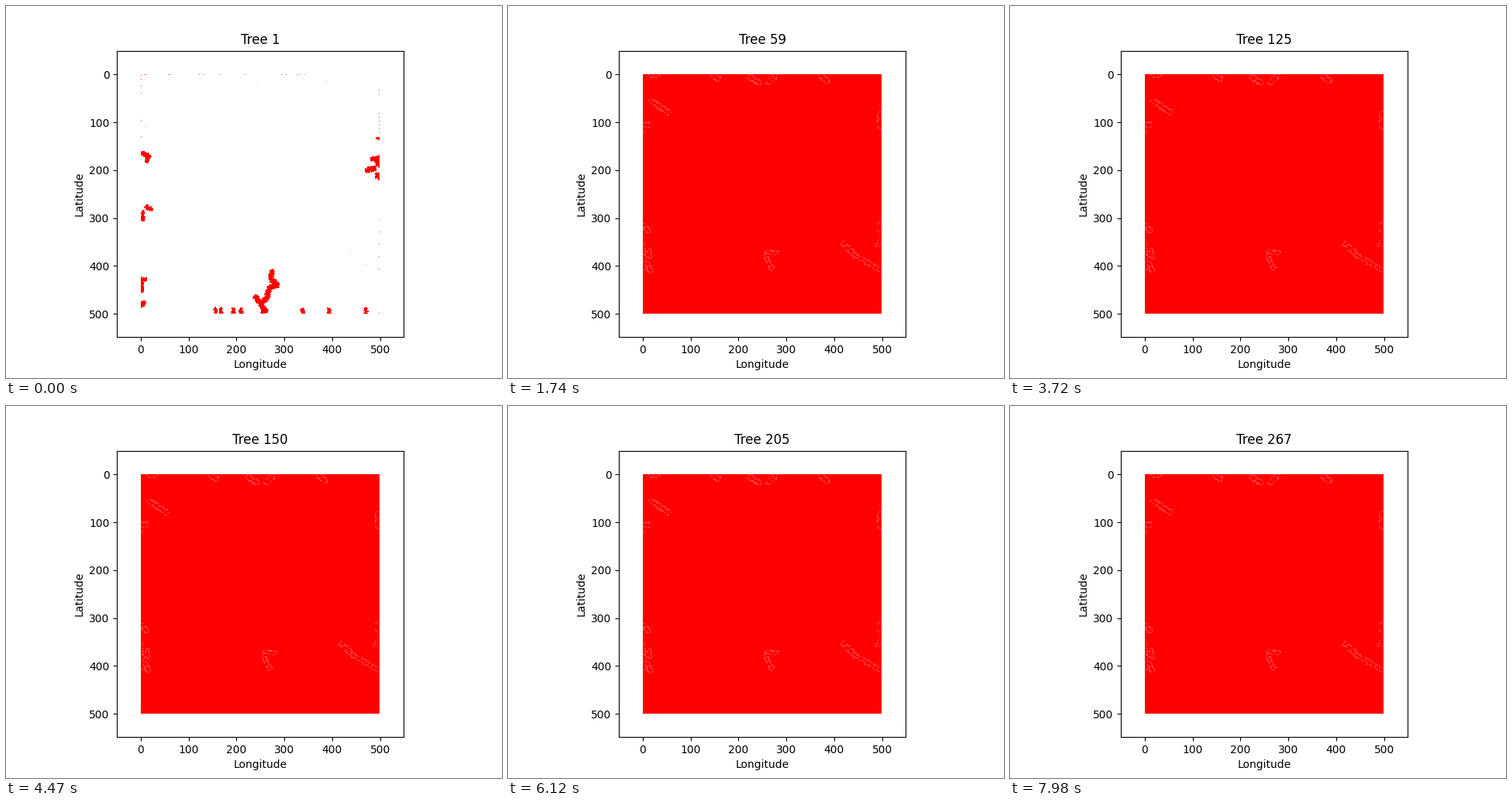
A matplotlib script for the animation above (8000 ms loop, 640 by 480 pixels).

```python
import numpy as np
import matplotlib.pyplot as plt
from matplotlib.animation import FuncAnimation

LOOP, FRAMES = 8000, 267
X0, Y0, W, H = 174, 88, 308, 309      # field in stage pixels
FULL = 50                             # tree that floods the field
rng = np.random.default_rng(4)

# Clusters run along short chains of points.
WEST = [[(176, 190), (184, 194), (181, 199)],
        [(181, 259), (187, 262)], [(176, 266), (176, 275)],
        [(179, 352), (175, 352), (174, 367)], [(177, 382), (175, 386)]]
SOUTH = [[(343, 343), (341, 351), (349, 359), (340, 363), (336, 376),
          (328, 384), (322, 375)], [(328, 384), (334, 393)]]
EAST = [[(473, 197), (480, 196), (481, 204)], [(466, 211), (474, 209)],
        [(479, 218), (481, 220)]]
FLOOR = [270, 277, 293, 303, 331, 382, 416, 464]

EARLY = [[(174, 163), (174, 166)], [(175, 283), (181, 290)],
         [(175, 307), (175, 339)], [(182, 315), (183, 323)],
         [(179, 332), (184, 343)], [(333, 318), (346, 318)],
         [(334, 322), (336, 331), (344, 344)],
         [(432, 306), (447, 321), (481, 341)],
         [(480, 280), (478, 288)], [(480, 304), (477, 308)]]
LATE = [[(185, 123), (207, 137)], [(176, 153), (181, 153)],
        [(480, 139), (480, 155)], [(186, 89), (192, 89)],
        [(265, 90), (271, 94)], [(313, 92), (324, 99)],
        [(336, 98), (345, 90)], [(404, 90), (412, 97)]]

gy, gx = np.mgrid[Y0:Y0 + H, X0:X0 + W]
noise = rng.normal(size=(H, W))
rough = 0.32 * (noise + np.roll(noise, 1, 0) + np.roll(noise, 1, 1))


def links(chains, step=99):
    """Cut chains into links no longer than step, lowest first."""
    parts = []
    for pts in np.array(chains, dtype=object):
        pts = np.array(pts, float)
        for a, b in zip(pts, pts[1:]):
            k = int(np.ceil(np.hypot(*(b - a)) / step))
            parts += [(a + (b - a) * j / k, a + (b - a) * (j + 1) / k)
                      for j in range(k)]
    return sorted(parts, key=lambda p: -min(p[0][1], p[1][1]))


def blob(r, a, b):
    """Ragged capsule from a to b."""
    dx, dy = b - a
    t = ((gx - a[0]) * dx + (gy - a[1]) * dy) / (dx * dx + dy * dy)
    t = np.clip(t, 0, 1)
    return np.hypot(gx - a[0] - t * dx, gy - a[1] - t * dy) + rough < r


born = np.full((H, W), FULL)
label = np.zeros((H, W), int)


def grow(chains, start, end, r):
    parts = links(chains, 9)
    times = np.linspace(start, end, len(parts)).round().astype(int)
    for (a, b), n in zip(parts, times):
        area = blob(r, a, b) & (born == FULL)
        born[area] = n
        label[area] = label.max() + 1


floor = [[(x, 391), (x, 396)] for x in FLOOR]
for chains, r in ((WEST, 2.9), (SOUTH, 3.6), (EAST, 3.8), (floor, 2.6),
                  ([[(479, 170), (481, 170)]], 2)):
    for a, b in links(chains):
        born[blob(r, a, b)] = 1
grow(EARLY, 2, 30, 2.5)
grow(LATE, 31, FULL - 1, 3)

# Faint broken seams stay between neighbouring trees.
seam = np.zeros((H, W), bool)
seam[:, :-1] |= label[:, :-1] != label[:, 1:]
seam[:-1] |= label[:-1] != label[1:]
seam &= rng.random((H, W)) < 0.6

# Lone cells along the edges.
dots = np.zeros((H, W))
dots[0, rng.choice(235, 13, replace=False)] = 0.75
dots[rng.choice(85, 6, replace=False), 0] = 0.75
dots[50:76:5, -1] = 0.75
dots[20:27:6, -1] = 0.75
dots[187:258:16, -1] = 0.75
dots[-1, -1] = 0.75
dots[11, 150] = dots[8, 239] = dots[67, 5] = 0.4
dots[231, 269] = dots[245, 289] = dots[-1, 0] = 0.4


def field(n):
    ink = np.where(born <= n, 1.0, dots)
    if n >= FULL:
        ink[seam] = 0.68
    rgb = np.full((H, W, 3), 255, np.uint8)
    rgb[..., 1:] = (255 * (1 - ink)).astype(np.uint8)[..., None]
    return rgb


fig, ax = plt.subplots(figsize=(6.4, 4.8), dpi=100)
ax.patch.set_visible(False)
ax.set_aspect("equal")
ax.set(xlim=(-49.9, 548.9), ylim=(548.9, -49.9),
       xlabel="Longitude", ylabel="Latitude",
       xticks=range(0, 501, 100), yticks=range(0, 501, 100))
title = ax.set_title("Tree 1")
image = fig.figimage(field(1), xo=X0, yo=480 - Y0 - H)


def draw(i):
    n = i + 1
    title.set_text(f"Tree {n}")
    image.set_data(field(n))
    return title, image


anim = FuncAnimation(fig, draw, frames=FRAMES, interval=LOOP / FRAMES,
                     repeat=True, repeat_delay=0, blit=False)
plt.show()
```
